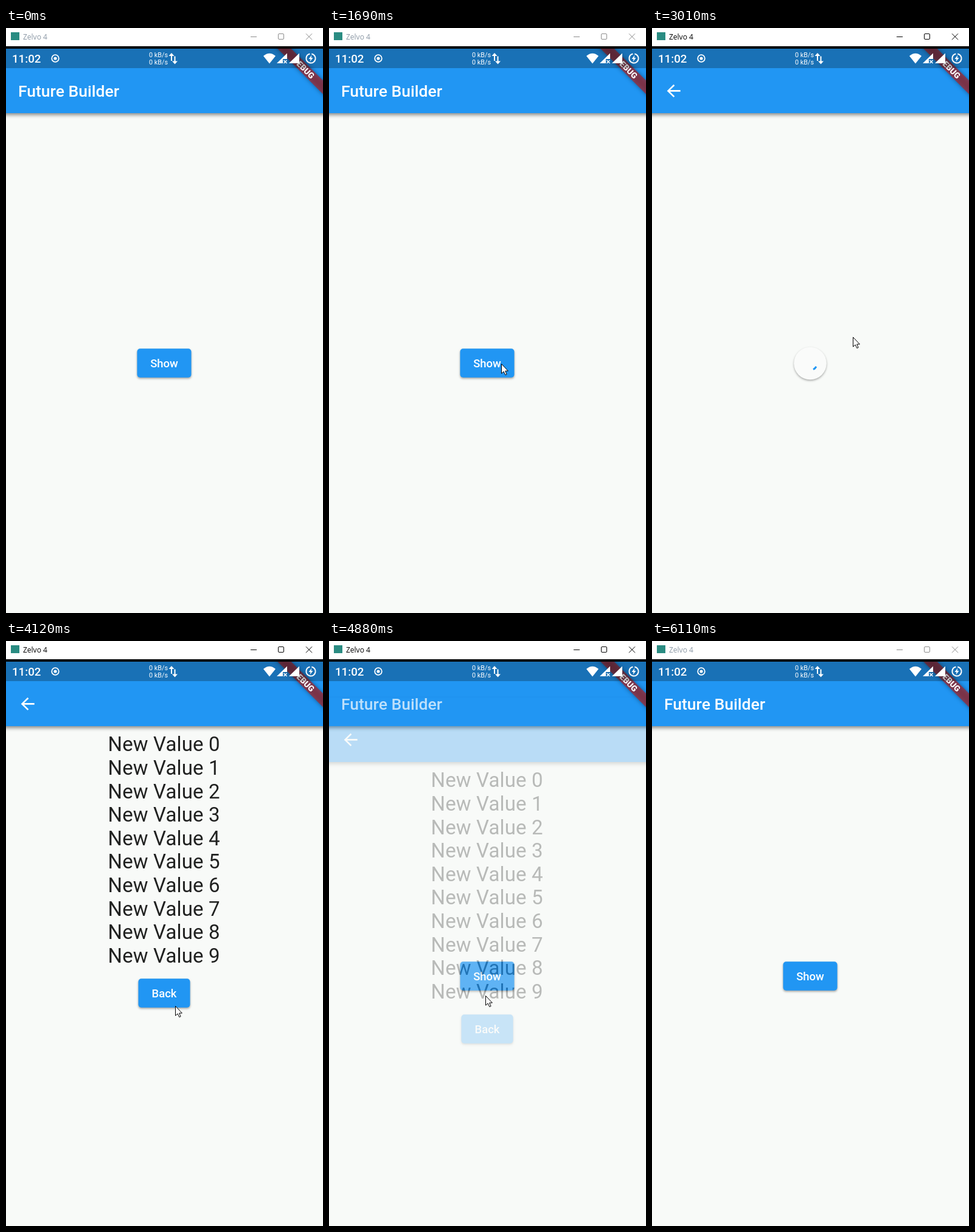
Recreate the animation shown at these times as an HTML page with a canvas. Size 521 by 962 pixels, loop 6.18 s.

```html
<!DOCTYPE html>
<html lang="en">
<head>
<meta charset="utf-8">
<title>Future Builder</title>
<style>
html, body { margin: 0; width: 100%; height: 100%; overflow: hidden; background: #f8faf8; }
canvas { display: block; }
</style>
</head>
<body>
<canvas id="stage" width="521" height="962"></canvas>
<script>
const W = 521, H = 962, LOOP = 6180, STEP = 69.2;
const DP = 1.32, TOP = 34, BAR = 140;
const BLUE = '#2196f3', BODY = '#f8faf8', WHITE = '#fff';
const ROBOTO = 'Roboto, sans-serif';
const PUSH = 1965, LOADED = 3960, POP = 4707, FADE = 300;
const SPIN_START = 1935, ENTER = 434, EXIT = 5765;

const stage = document.getElementById('stage').getContext('2d');
const layer = document.createElement('canvas');
layer.width = W;
layer.height = H;
const page = layer.getContext('2d');

const clamp = v => Math.max(0, Math.min(1, v));
const progress = (t, from, to) => clamp((t - from) / (to - from));
const smooth = k => k * k * (3 - 2 * k);

function bezier(x1, y1, x2, y2) {
  const at = (a, b, s) => 3 * a * s * (1 - s) ** 2 + 3 * b * s * s * (1 - s) + s ** 3;
  return x => {
    if (x <= 0 || x >= 1) return clamp(x);
    let lo = 0, hi = 1;
    for (let i = 0; i < 24; i++) {
      const mid = (lo + hi) / 2;
      if (at(x1, x2, mid) < x) lo = mid; else hi = mid;
    }
    return at(y1, y2, lo);
  };
}
const fastOutSlowIn = bezier(0.4, 0, 0.2, 1);
const easeIn = bezier(0.42, 0, 1, 1);

// Pointer moves: from when, to when, where to
const moves = [
  { from: ENTER, to: 642, x: 355, y: 687 },
  { from: 800, to: 1620, x: 283, y: 552 },
  { from: 2400, to: 2800, x: 330, y: 508 },
  { from: 3250, to: 4050, x: 278, y: 600 },
  { from: 4250, to: 4500, x: 257, y: 583 },
  { from: 5180, to: EXIT, x: 503, y: 957 }
];

function pointerAt(t) {
  let x = 508, y = 934;
  for (const move of moves) {
    const k = smooth(progress(t, move.from, move.to));
    x += (move.x - x) * k;
    y += (move.y - y) * k;
  }
  return [x, y];
}

function text(c, str, x, y, font, color, align = 'left') {
  c.font = font;
  c.fillStyle = color;
  c.textAlign = align;
  c.fillText(str, x, y);
}

function trace(c, points) {
  points.forEach(([x, y], i) => i ? c.lineTo(x, y) : c.moveTo(x, y));
}

function lines(c, color, width, ...paths) {
  c.strokeStyle = color;
  c.lineWidth = width;
  c.beginPath();
  for (const path of paths) trace(c, path);
  c.stroke();
}

function fillPoly(c, color, points) {
  c.fillStyle = color;
  c.beginPath();
  trace(c, points);
  c.closePath();
  c.fill();
}

function disc(c, x, y, r, color) {
  c.fillStyle = color;
  c.beginPath();
  c.arc(x, y, r, 0, 7);
  c.fill();
}

function arc(c, x, y, r, width, color, start = 0, sweep = 7) {
  c.strokeStyle = color;
  c.lineWidth = width;
  c.beginPath();
  c.arc(x, y, r, start, start + sweep);
  c.stroke();
}

function raised(c, alpha, blur, dy, paint) {
  c.save();
  c.shadowColor = `rgba(0,0,0,${alpha})`;
  c.shadowBlur = blur;
  c.shadowOffsetY = dy;
  paint();
  c.restore();
}

function button(c, label, y, w, splash) {
  const x = 260 - w / 2;
  c.beginPath();
  c.roundRect(x, y, w, 47.5, 5);
  c.fillStyle = BLUE;
  raised(c, 0.36, 3.5, 1.8, () => c.fill());
  if (splash) {
    c.save();
    c.clip();
    disc(c, splash.x, splash.y, 12 + 85 * splash.k, `rgba(255,255,255,${0.24 * clamp(splash.k * 3)})`);
    c.restore();
  }
  text(c, label, 260, Math.round(y + 30.5), `500 18.5px ${ROBOTO}`, WHITE, 'center');
}

function appBar(c) {
  c.fillStyle = BODY;
  c.fillRect(0, TOP, W, H);
  c.fillStyle = BLUE;
  raised(c, 0.46, 6, 2.5, () => c.fillRect(-10, TOP, W + 20, BAR - TOP));
}

function homePage(c, t) {
  appBar(c);
  text(c, 'Future Builder', 20, 113, `500 26.5px ${ROBOTO}`, WHITE);
  const splash = t > 1830 && t < 2400 && { x: 283, y: 552, k: progress(t, 1830, 2000) };
  button(c, 'Show', 527.3, 89, splash);
}

function spinner(c, t) {
  const x = 260, y = 551.5, age = t - SPIN_START;
  raised(c, 0.32, 3.5, 1.8, () => disc(c, x, y, 26.8, '#fafbfa'));
  const cycle = (age / 1333) % 1, turn = age / 2222;
  const head = fastOutSlowIn(clamp(cycle * 2));
  const tail = fastOutSlowIn(clamp(cycle * 2 - 1));
  const start = Math.PI * (-0.5 + 1.5 * tail + 2 * turn + 0.5 * cycle);
  const sweep = Math.max(1.5 * Math.PI * (head - tail), 0.01);
  arc(c, x, y, 8.5 * DP, 3, BLUE, start, sweep);
}

function valuesPage(c, t) {
  appBar(c);
  const tip = [26.5, 103.4];
  lines(c, WHITE, 2.6, [[46.7, 103.4], tip], [[36.4, 93.7], tip, [36.4, 113.1]]);
  if (t < LOADED) return spinner(c, t);
  c.letterSpacing = '0.12px';
  for (let i = 0; i < 10; i++) {
    const y = Math.floor(181.8 + i * 38.6);
    text(c, `New Value ${i}`, 259.6, y, `33px ${ROBOTO}`, 'rgba(0,0,0,.87)', 'center');
  }
  c.letterSpacing = '0px';
  const splash = t > 4600 && { x: 257, y: 583, k: progress(t, 4600, 4770) };
  button(c, 'Back', 555.3, 85, splash);
}

function drawPages(c, t) {
  homePage(c, t);
  const k = progress(t, PUSH, PUSH + FADE) - progress(t, POP, POP + FADE);
  if (k <= 0) return;
  page.clearRect(0, 0, W, H);
  valuesPage(page, t);
  c.globalAlpha = easeIn(k);
  c.drawImage(layer, 0, Math.round((H - TOP) / 4 * (1 - fastOutSlowIn(k))));
  c.globalAlpha = 1;
}

function debugBanner(c) {
  c.save();
  c.beginPath();
  c.rect(0, TOP, W, H);
  c.clip();
  c.translate(W, TOP);
  c.rotate(Math.PI / 4);
  const x = -60 * DP, y = 28 * DP, w = 120 * DP, h = 12 * DP;
  c.filter = 'blur(3.5px)';
  c.fillStyle = 'rgba(0,0,0,.4)';
  c.fillRect(x, y, w, h);
  c.filter = 'none';
  c.fillStyle = 'rgba(183,28,28,.627)';
  c.fillRect(x, y, w, h);
  text(c, 'DEBUG', 0, y + 12.7, `900 13.5px ${ROBOTO}`, WHITE, 'center');
  c.restore();
}

// Arrow with its head at y, pointing up (dir 1) or down (dir -1)
function trafficArrow(c, x, y, dir) {
  fillPoly(c, WHITE, [[x - 4.5, y + 5 * dir], [x, y], [x + 4.5, y + 5 * dir]]);
  lines(c, WHITE, 2, [[x, y + 4 * dir], [x, y + 13 * dir]]);
}

function statusBar(c) {
  c.fillStyle = 'rgba(0,0,0,.25)';
  c.fillRect(0, TOP, W, 32);
  text(c, '11:02', 10, 57, `500 18.7px ${ROBOTO}`, WHITE);
  arc(c, 81, 50, 5.8, 1.8, WHITE);
  disc(c, 81, 50, 2.6, WHITE);

  for (const y of [48, 60]) text(c, '0 kB/s', 235, y, `10.8px ${ROBOTO}`, WHITE);
  trafficArrow(c, 272, 41, 1);
  trafficArrow(c, 277.5, 59.5, -1);

  // Wi-Fi fan and the two signal wedges
  c.beginPath();
  c.moveTo(433, 58.5);
  c.lineTo(423, 46);
  c.quadraticCurveTo(433, 37.5, 443, 46);
  c.fill();
  fillPoly(c, WHITE, [[445, 58], [462, 41.5], [462, 51], [455, 51], [455, 58]]);
  lines(c, WHITE, 1.5, [[456.5, 53], [461.5, 58]], [[461.5, 53], [456.5, 58]]);
  fillPoly(c, WHITE, [[465, 58], [482, 41.5], [482, 58]]);

  arc(c, 501, 50, 7.6, 2, WHITE, -1.4, 5.9);
  fillPoly(c, WHITE, [[502.5, 44.5], [497.5, 51], [500.5, 51], [499.5, 55.5], [504.5, 49], [501.5, 49]]);
}

function titleBar(c, active) {
  c.fillStyle = WHITE;
  c.fillRect(0, 0, W, 30);
  c.fillStyle = '#000';
  c.fillRect(0, 30, W, 4);
  c.fillStyle = '#2a8c82';
  c.fillRect(8, 7, 14, 13);
  text(c, 'Zelvo 4', 28, 19, '12px "Open Sans", sans-serif', active ? '#000' : '#8b98a5');
  const ink = active ? '#000' : '#8c8c8c';
  lines(c, ink, 1, [[402, 14.5], [412, 14.5]], [[493, 9.3], [503, 19.3]], [[503, 9.3], [493, 19.3]]);
  c.beginPath();
  c.roundRect(447.5, 9.5, 9, 9, 1.5);
  c.stroke();
}

function drawPointer(c, [x, y]) {
  c.save();
  c.translate(Math.round(x) + 0.5, Math.round(y) + 0.5);
  fillPoly(c, WHITE, [[0, 0], [0, 15.6], [3.6, 12.4], [6.3, 18], [8.6, 17], [6.2, 11.5], [10.9, 11.5]]);
  c.strokeStyle = '#000';
  c.lineWidth = 1;
  c.stroke();
  c.restore();
}

function draw(t) {
  drawPages(stage, t);
  debugBanner(stage);
  statusBar(stage);
  titleBar(stage, t > 1820 && t < 5880);
  if (t >= ENTER && t < EXIT + STEP / 2) drawPointer(stage, pointerAt(t));
}

const origin = performance.now();
function tick() {
  const t = (performance.now() - origin) % LOOP;
  draw(Math.max(0, 850 + Math.floor((t - 850) / STEP) * STEP));
  requestAnimationFrame(tick);
}
tick();
</script>
</body>
</html>
```
